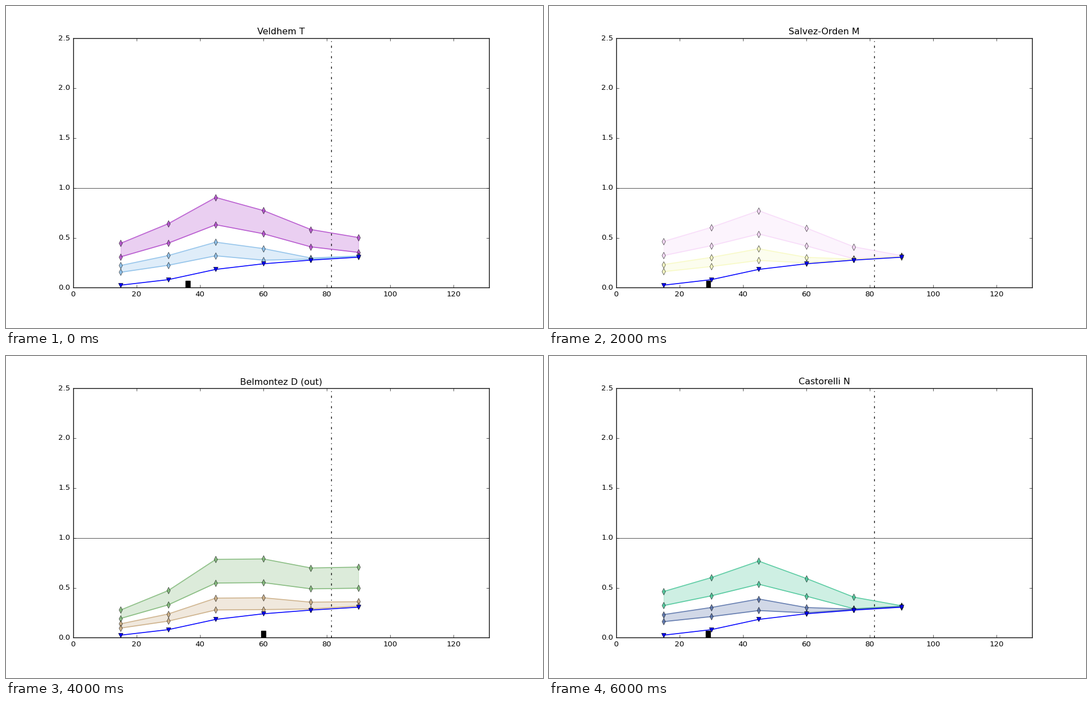
Animation of 966x580 px, one loop 7000 ms. Source, as a matplotlib script:

```python
import matplotlib.pyplot as plt
import numpy as np
from matplotlib.animation import FuncAnimation

plt.style.use("classic")
plt.rcParams.update({
    "font.family": "sans-serif",
    "font.sans-serif": ["DejaVu Sans"],
    "font.size": 10,
    "figure.facecolor": "white",
    "savefig.facecolor": "white",
    "savefig.dpi": "figure",
})

X = np.arange(15, 91, 15)
GAS = np.array([.026, .081, .184, .240, .277, .306])
DISC = np.array([.356, .773, 1.643, 2.115, 2.394, 3.105])
THICK = .695   # lower edge of a band relative to its upper edge
WEIGHT = .05   # share of the weaker component in the sum

# title, scale length, central density, colours of the top and low band
PANELS = [
    ("Veldhem T", 36.2, 1.89, "#ae42c9", "#83bbe8"),
    ("Veldhem K", 42.8, 1.62, "#cbcfdb", "#bf5bd3"),
    ("Salvez-Orden M", 29.1, 2.18, "#f7d7f9", "#f7fabe"),
    ("Belmontez D (in)", 30.0, 2.14, "#eb57b3", "#e3776b"),
    ("Belmontez D (out)", 60.0, 1.00, "#77b36f", "#c7a77b"),
    ("new Belmontez D (in)", 19.1, 3.32, "#d36bbf", "#50ec4a"),
    ("Castorelli N", 29.0, 2.18, "#3fc393", "#4b67a3"),
]

fig = plt.figure(figsize=(10, 6.00415), dpi=96.6)
ax = fig.add_axes([.125, .125, .775, .775])


def combine(stars):
    """Sum of stars and gas in which the weaker one counts little."""
    return np.maximum(stars + WEIGHT * GAS, GAS + WEIGHT * stars)


def draw_band(stars, color):
    upper, lower = combine(stars), combine(stars * THICK)
    ax.fill_between(X, lower, upper, color=color, alpha=.25)
    for edge in (upper, lower):
        ax.plot(X, edge, marker="d", lw=1.2, color=color, alpha=.8)


def draw(i):
    title, length, density, top_color, low_color = PANELS[i]
    stars = density * DISC * np.exp(-X / length)

    ax.clear()
    ax.axhline(1, color="black", lw=.5)
    ax.axvline(81.45, color="black", ls="-.", lw=1)
    ax.bar(length, .07, width=1.3, align="center", color="black")
    draw_band(stars, top_color)
    draw_band(stars / 2, low_color)
    ax.plot(X, GAS, marker="v", lw=1.2, color="blue")

    ax.set_title(title)
    ax.set_xticks(np.arange(0, 121, 20))
    ax.set_yticks(np.arange(0, 2.6, .5))
    ax.set_xlim(0, 131.3)
    ax.set_ylim(0, 2.5)
    return []


anim = FuncAnimation(fig, draw, frames=len(PANELS), interval=1000,
                     init_func=lambda: draw(0), repeat=True)
plt.show()
```
